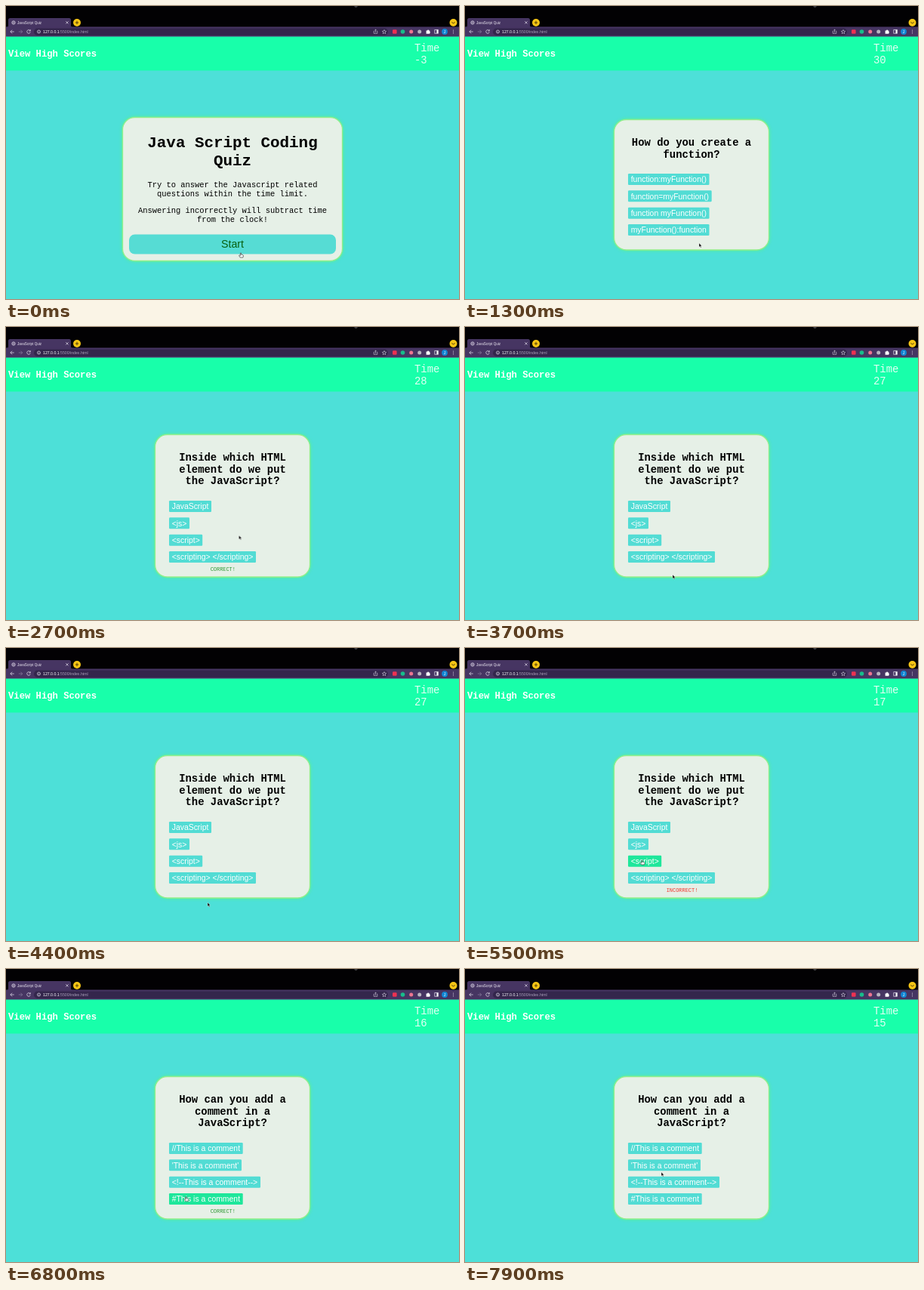
Recreate the animation shown at these times as an HTML page. Size 600x388 px, loop 8 s.

```html
<!DOCTYPE html>
<html lang="en">
<head>
<meta charset="utf-8">
<title>JavaScript Quiz</title>
<style>
html, body { margin: 0; width: 100%; height: 100%; overflow: hidden; background: #4de0d8; }
svg { display: block; }
text { font-family: "Liberation Mono", "Courier New", monospace; }
.ui, .opt text, .start { font-family: "Liberation Sans", Arial, sans-serif; }
.mid { text-anchor: middle; }
.h1 { font-size: 20.86px; font-weight: bold; }
.p { font-size: 10.43px; }
.h2 { font-size: 13.9px; font-weight: bold; }
.time { font-size: 13.9px; fill: #e2fff4; }
.opt text { font-size: 10.43px; fill: #fff; }
.opt rect { fill: #52dcd4; }
.msg { font-size: 6.95px; text-anchor: middle; }
.good { fill: #2f9a35; }
.bad { fill: #f0352c; }
.card { fill: #e6f0e7; stroke: #92ee8c; stroke-width: 1.3; filter: drop-shadow(0 0 2px #58f58a); }
.icon { fill: none; stroke: #d8d2e2; stroke-width: .8; }

.anim { animation: 8s step-end infinite; }
#intro { animation-name: intro; }
#q1 { animation-name: q1; }
#q2 { animation-name: q2; }
#q3 { animation-name: q3; }
#yes { animation-name: yes; }
#no { animation-name: no; }
#hand { animation-name: hand; }
#arrow { animation-name: arrow; }
#count { animation-name: count; }
#cursor { animation: move 8s linear infinite; }

/* screens change at 500, 2200 and 6400 ms */
@keyframes intro { 0% { opacity: 1 } 6.25%, 100% { opacity: 0 } }
@keyframes q1 { 0%, 27.5%, 100% { opacity: 0 } 6.25% { opacity: 1 } }
@keyframes q2 { 0%, 80%, 100% { opacity: 0 } 27.5% { opacity: 1 } }
@keyframes q3 { 0% { opacity: 0 } 80%, 100% { opacity: 1 } }

/* answer feedback stays for one second */
@keyframes yes { 0%, 40%, 92.5%, 100% { opacity: 0 } 27.5%, 80% { opacity: 1 } }
@keyframes no { 0%, 76.25%, 100% { opacity: 0 } 63.75% { opacity: 1 } }

@keyframes count {
  0% { transform: none }
  6.25% { transform: translateY(-16px) }
  18.75% { transform: translateY(-32px) }
  31.25% { transform: translateY(-48px) }
  43.75% { transform: translateY(-64px) }
  56.25% { transform: translateY(-80px) }
  68.75% { transform: translateY(-96px) }
  81.25% { transform: translateY(-112px) }
  93.75%, 100% { transform: translateY(-128px) }
}

@keyframes move {
  0%, 12.5% { transform: translate(311px, 327px) }
  16.25%, 18.75% { transform: translate(310px, 314px) }
  25%, 36.25% { transform: translate(308.5px, 276px) }
  46.25%, 47.5% { transform: translate(275px, 328px) }
  55%, 58.75% { transform: translate(267px, 337px) }
  62.5%, 71.25% { transform: translate(234.5px, 281px) }
  75%, 87.5% { transform: translate(238.5px, 301.5px) }
  90%, 92.5% { transform: translate(243px, 298px) }
  97.5%, 100% { transform: translate(260px, 269px) }
}

/* pointer shape and option highlight follow the path above */
@keyframes hand {
  0%, 20.4%, 24%, 40.3%, 60.4%, 61.9%, 74.2%, 93.85% { opacity: 1 }
  6.25%, 22.9%, 27.5%, 43.2%, 61.4%, 72.9%, 92.7%, 96.4%, 100% { opacity: 0 }
}
@keyframes arrow {
  0%, 20.4%, 24%, 40.3%, 60.4%, 61.9%, 74.2%, 93.85% { opacity: 0 }
  6.25%, 22.9%, 27.5%, 43.2%, 61.4%, 72.9%, 92.7%, 96.4%, 100% { opacity: 1 }
}
#q1c { animation-name: q1c; }
#q1d { animation-name: q1d; }
#q2c { animation-name: q2c; }
#q2d { animation-name: q2d; }
#q3c { animation-name: q3c; }
#q3d { animation-name: q3d; }
@keyframes q1c { 24% { fill: #1ee79b } 27.5% { fill: #52dcd4 } }
@keyframes q1d { 20.4% { fill: #1ee79b } 22.9% { fill: #52dcd4 } }
@keyframes q2c { 61.9% { fill: #1ee79b } 72.9% { fill: #52dcd4 } }
@keyframes q2d { 40.3%, 60.4%, 74.2% { fill: #1ee79b } 43.2%, 61.4%, 80% { fill: #52dcd4 } }
@keyframes q3c { 93.85% { fill: #1ee79b } 96.4% { fill: #52dcd4 } }
@keyframes q3d { 80% { fill: #1ee79b } 92.7% { fill: #52dcd4 } }
</style>
</head>
<body>
<svg width="600" height="388" viewBox="0 0 600 388">
  <rect width="600" height="388" fill="#4de0d8"/>

  <!-- browser -->
  <rect width="600" height="29" fill="#020103"/>
  <path d="M461 0h5l-1.500 2h-2z" fill="#3a3a3e"/>
  <path d="M1 28q2 0 2-2v-7.500q0-2.500 2.500-2.500h78q2.500 0 2.500 2.500V26q0 2 2 2z" fill="#463562"/>
  <rect y="27.500" width="600" height="13.200" fill="#463562"/>
  <rect x="37" y="29.500" width="469" height="9.500" rx="4.700" fill="#34264c"/>
  <g class="icon">
    <circle cx="10" cy="22" r="2.200"/>
    <path d="M8 22h4M10 20v4" stroke-width=".5"/>
    <path d="M79.300 20.300l3.200 3.200m0-3.200l-3.200 3.200"/>
    <path d="M10.700 34H5.800m2.300-2.300L5.800 34l2.300 2.300"/>
    <path d="M16.800 34h4.900m-2.300-2.300l2.300 2.300-2.300 2.300" stroke="#85789a"/>
    <path d="M32 32.700a2.300 2.300 0 1 0 .3 1.800M32.300 31.200v1.800h-1.800"/>
    <circle cx="43.500" cy="34" r="2"/>
    <path d="M43.500 33.600v1.400" stroke-width=".6"/>
    <path d="M488 33.300h-.8v3h4.600v-3H491M489.500 35v-4m-1.200 1.200l1.200-1.200 1.200 1.200" stroke-width=".6"/>
    <path d="M501 31.500l.8 1.700 1.900.2-1.400 1.300.4 1.900-1.700-1-1.700 1 .4-1.900-1.400-1.300 1.900-.2z" stroke-width=".6"/>
    <rect x="567.800" y="31.600" width="4.600" height="4.600"/>
    <path d="M571.300 31.600v4.600" stroke-width="1.700" stroke="#fff"/>
  </g>
  <circle cx="94" cy="22" r="5" fill="#f6c515"/>
  <path d="M91.800 22h4.400M94 19.800v4.400" stroke="#33250a" stroke-width=".8"/>
  <circle cx="592.500" cy="22" r="5" fill="#f6c515"/>
  <path d="M590.500 21.200l2 2 2-2" fill="none" stroke="#33250a" stroke-width=".9"/>
  <rect x="512" y="31.200" width="5.600" height="5.600" rx="1.200" fill="#ee3152"/>
  <circle cx="525.500" cy="34" r="2.800" fill="#17bd8b"/>
  <circle cx="536.700" cy="34" r="2.500" fill="#ee7590"/>
  <circle cx="547.700" cy="34" r="2.500" fill="#b9b5c0"/>
  <path d="M556.600 32.500h1.500a1 1 0 0 1 2 0h1.200v1.500a1 1 0 0 1 0 1.800v1h-4.700z" fill="#fff"/>
  <circle cx="581" cy="34" r="3.900" fill="#1287d4"/>
  <text class="ui mid" x="581" y="35.800" font-size="5" fill="#fff">J</text>
  <g fill="#d8d2e2"><circle cx="592.500" cy="32" r=".6"/><circle cx="592.500" cy="34" r=".6"/><circle cx="592.500" cy="36" r=".6"/></g>
  <text class="ui" x="15" y="23.700" font-size="4.600" fill="#eeeaf4">JavaScript Quiz</text>
  <text class="ui" x="49" y="35.900" font-size="5.200" fill="#fff">127.0.0.1<tspan fill="#aaa0b9">:5500/index.html</tspan></text>

  <!-- page header -->
  <rect y="40.700" width="600" height="44.800" fill="#18ffaa"/>
  <text x="3" y="66.500" font-size="12.200" font-weight="bold" fill="#fff">View High Scores</text>
  <text class="time" x="541" y="60">Time</text>
  <svg x="541" y="63" width="40" height="15">
    <g id="count" class="anim">
      <text class="time" y="12.500">-3</text>
      <text class="time" y="28.500">30</text>
      <text class="time" y="44.500">29</text>
      <text class="time" y="60.500">28</text>
      <text class="time" y="76.500">27</text>
      <text class="time" y="92.500">26</text>
      <text class="time" y="108.500">17</text>
      <text class="time" y="124.500">16</text>
      <text class="time" y="140.500">15</text>
    </g>
  </svg>

  <g id="intro" class="anim">
    <rect class="card" x="154.500" y="147.500" width="291" height="190" rx="16"/>
    <g class="mid">
      <text class="h1" x="300" y="187">Java Script Coding</text>
      <text class="h1" x="300" y="211">Quiz</text>
      <text class="p" x="300" y="240">Try to answer the Javascript related</text>
      <text class="p" x="300" y="251.700">questions within the time limit.</text>
      <text class="p" x="300" y="274">Answering incorrectly will subtract time</text>
      <text class="p" x="300" y="285.700">from the clock!</text>
      <rect x="163" y="302.500" width="274" height="26" rx="7.500" fill="#56dcd4"/>
      <text class="start" x="300" y="320.300" font-size="14.200" fill="#07600f">Start</text>
    </g>
  </g>

  <g id="q1" class="anim">
    <rect class="card" x="197.500" y="150.500" width="205" height="172.500" rx="16"/>
    <g class="h2 mid">
      <text x="300" y="185">How do you create a</text>
      <text x="300" y="200.700">function?</text>
    </g>
    <g class="opt" transform="translate(216 222)">
      <rect width="107.500" height="15" rx="1.300"/><text x="3.700" y="11.200">function:myFunction()</text>
      <rect y="22.300" width="110.700" height="15" rx="1.300"/><text x="3.700" y="33.500">function=myFunction()</text>
      <rect id="q1c" class="anim" y="44.700" width="107.500" height="15" rx="1.300"/><text x="3.700" y="55.900">function myFunction()</text>
      <rect id="q1d" class="anim" y="67" width="107.500" height="15" rx="1.300"/><text x="3.700" y="78.200">myFunction():function</text>
    </g>
  </g>

  <g id="q2" class="anim">
    <rect class="card" x="197.500" y="142.500" width="205" height="188.500" rx="16"/>
    <g class="h2 mid">
      <text x="300" y="177">Inside which HTML</text>
      <text x="300" y="192.700">element do we put</text>
      <text x="300" y="208.400">the JavaScript?</text>
    </g>
    <g class="opt" transform="translate(216 230)">
      <rect width="56" height="15" rx="1.300"/><text x="3.700" y="11.200">JavaScript</text>
      <rect y="22.300" width="27" height="15" rx="1.300"/><text x="3.700" y="33.500">&lt;js&gt;</text>
      <rect id="q2c" class="anim" y="44.700" width="44.200" height="15" rx="1.300"/><text x="3.700" y="55.900">&lt;script&gt;</text>
      <rect id="q2d" class="anim" y="67" width="115" height="15" rx="1.300"/><text x="3.700" y="78.200">&lt;scripting&gt; &lt;/scripting&gt;</text>
    </g>
  </g>

  <g id="q3" class="anim">
    <rect class="card" x="197.500" y="142.500" width="205" height="188.500" rx="16"/>
    <g class="h2 mid">
      <text x="300" y="177">How can you add a</text>
      <text x="300" y="192.700">comment in a</text>
      <text x="300" y="208.400">JavaScript?</text>
    </g>
    <g class="opt" transform="translate(216 230)">
      <rect width="97.700" height="15" rx="1.300"/><text x="3.700" y="11.200">//This is a comment</text>
      <rect y="22.300" width="96" height="15" rx="1.300"/><text x="3.700" y="33.500">'This is a comment'</text>
      <rect id="q3c" class="anim" y="44.700" width="121" height="15" rx="1.300"/><text x="3.700" y="55.900">&lt;!--This is a comment--&gt;</text>
      <rect id="q3d" class="anim" y="67" width="97.700" height="15" rx="1.300"/><text x="3.700" y="78.200">#This is a comment</text>
    </g>
  </g>

  <g id="yes" class="anim"><text class="msg good" x="287.300" y="323">CORRECT!</text></g>
  <g id="no" class="anim"><text class="msg bad" x="287.500" y="323">INCORRECT!</text></g>

  <g id="cursor">
    <path id="arrow" class="anim" d="M0 0v5.200l1.200-1.100.9 2 .9-.4-.9-1.900h1.600z" fill="#0b0b0b" stroke="#fff" stroke-width=".35"/>
    <path id="hand" class="anim" d="M-.6.200q.6-.7 1.200 0v2l2.200.5q.7.200.6 1l-.5 2.300H-.9L-2.300 3.700q0-.9.700-.7l1 .6z" fill="#fff" stroke="#222" stroke-width=".6"/>
  </g>
</svg>
</body>
</html>
```
